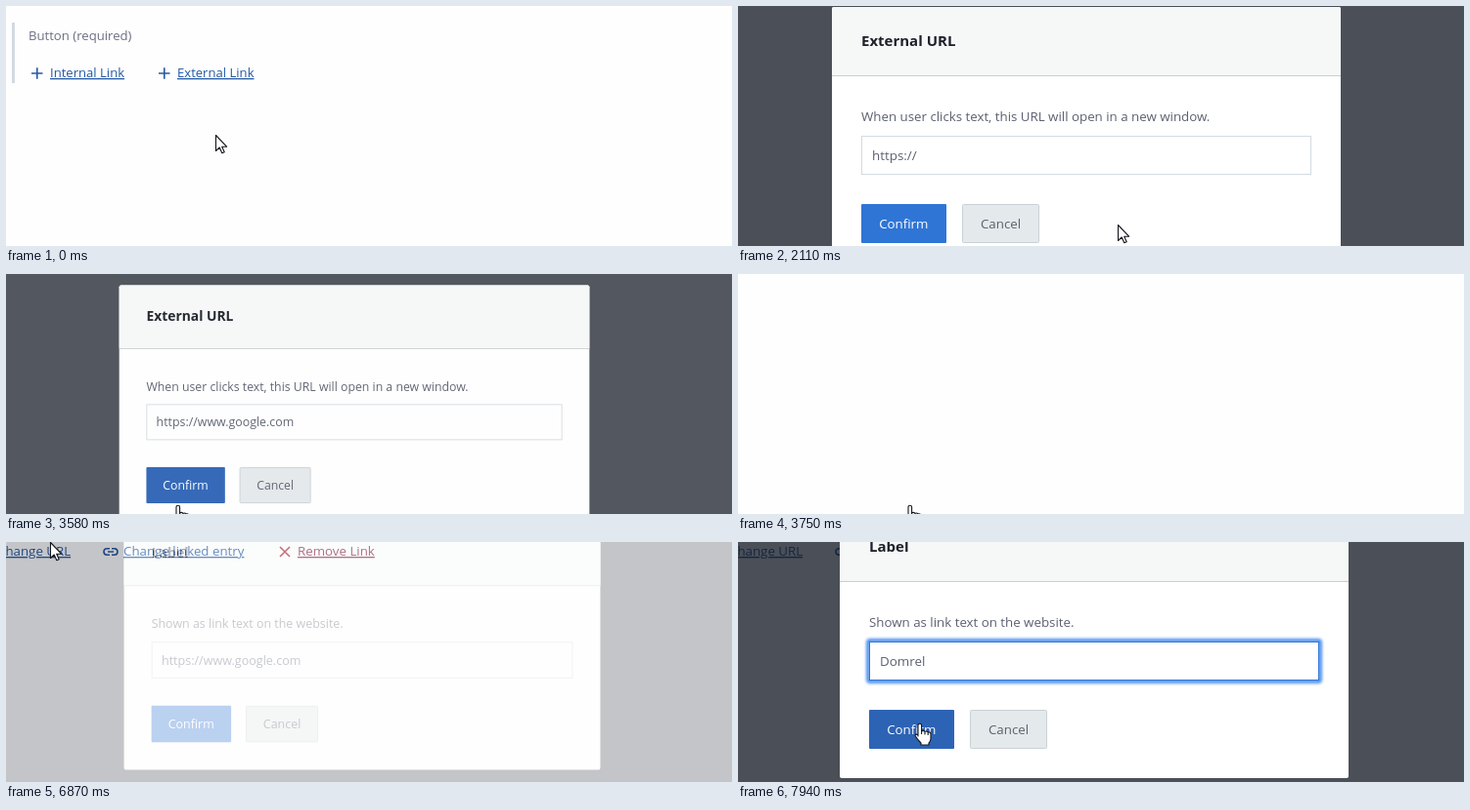
Recreate the animation shown at these times as an HTML page. Size 742 px wide and 246 px high, loop 8000 ms.

```html
<!DOCTYPE html>
<html lang="en">
<head>
<meta charset="utf-8">
<title>Link field demo</title>
<style>
  html, body { margin: 0; width: 100%; height: 100%; overflow: hidden; background: #fefefe; }
  svg { display: block; font: 13.3px "Open Sans", "Noto Sans", sans-serif; fill: #5c6070; }
  text { white-space: pre; }
  .muted { fill: #6b6f80; }
  .link { fill: #2459a5; stroke: none; text-decoration: underline; }
  .icon { fill: none; stroke: #2459a5; stroke-width: 1.6; }
  .hover .link { fill: #163f7c; }
  .hover .icon { stroke: #163f7c; }
  .hover .solid { fill: #163f7c; }
  .solid { fill: #2459a5; }
  .danger .link { fill: #8c2f4d; }
  .danger .icon { stroke: #b02f42; }
  .title { font-weight: 700; font-size: 15px; fill: #1d2129; }
  .field { fill: #fff; stroke: #d3dae2; }
  .focus .field { stroke: #2f75d6; }
  .value { font-size: 13.4px; }
  .button { text-anchor: middle; }
  .cursor { fill: #fff; stroke: #14161c; stroke-width: 1.1; stroke-linejoin: round; }
</style>
</head>
<body>
<svg width="742" height="246" viewBox="0 0 742 246">
  <defs>
    <filter id="blur" x="-5%" y="-50%" width="110%" height="200%"><feGaussianBlur stdDeviation="1.8"/></filter>
    <clipPath id="clip"><rect id="clipBox" y="140" height="26"/></clipPath>
    <path id="chain" d="M7 4.7H4.3a3.3 3.3 0 0 0 0 6.6H7M9 4.7h2.7a3.3 3.3 0 0 1 0 6.6H9M5 8h6"/>
  </defs>

  <g id="empty">
    <path d="M6 17h3v62h-3z" fill="#d3dae0"/>
    <text x="23" y="35" class="muted" font-size="13.15">Button (required)</text>
    <g font-size="13.1">
      <path class="icon" d="M26 69h11.5M31.8 63.2v11.5"/>
      <text class="link" x="45" y="73">Internal Link</text>
    </g>
    <g id="external" font-size="13.1">
      <path class="icon" d="M156 69h11.5M161.8 63.2v11.5"/>
      <text class="link" x="175" y="73">External Link</text>
    </g>
  </g>

  <g id="entry">
    <path d="M14 6h3v196h-3z" fill="#2f75d6"/>
    <text x="31" y="23" class="muted" font-size="13.15">Button (required)</text>
    <rect x="31.5" y="31.5" width="702" height="134" rx="1" fill="#e9edf0"/>
    <rect x="31.5" y="30.5" width="702" height="134" rx="1" fill="#fff" stroke="#d3dae0"/>
    <text x="46" y="63" class="muted" font-size="14.8">External</text>
    <text x="46" y="91" font-size="15.35" font-weight="700" fill="#1a1d24">https://www.google.com</text>
    <text x="46" y="119" font-size="15.25" fill="#2b2f38">https://www.google.com</text>
    <g id="rename">
      <path class="solid" transform="translate(30.7 182.8) scale(.75)" d="M3 17.25V21h3.75L17.81 9.94l-3.75-3.75zM20.71 7.04a1 1 0 0 0 0-1.41l-2.34-2.34a1 1 0 0 0-1.41 0l-1.83 1.83 3.75 3.75z"/>
      <text class="link" x="53" y="196">Change Label</text>
    </g>
    <use href="#chain" class="icon" x="170" y="184"/>
    <text class="link" x="191" y="196">Change URL</text>
    <use href="#chain" class="icon" x="299" y="184"/>
    <text class="link" x="320" y="196">Change linked entry</text>
    <g class="danger">
      <path class="icon" d="M480 187l10 10m0-10l-10 10"/>
      <text class="link" x="498" y="196">Remove Link</text>
    </g>
  </g>

  <g id="dialog">
    <rect width="742" height="246" fill="#0f141f" fill-opacity=".75"/>
    <g id="panel">
      <rect x="96" y="1" width="520" height="272" rx="2" fill="#fff"/>
      <path d="M96 71V3a2 2 0 0 1 2-2H614a2 2 0 0 1 2 2V71z" fill="#f6f8f8"/>
      <path d="M96 71.5H616" stroke="#c5ced3"/>
      <text id="title" class="title" x="126" y="41"></text>
      <text id="hint" x="126" y="118"></text>
      <rect id="glow" x="125" y="132" width="462" height="42" rx="2" fill="none" stroke="#4b90f0" stroke-width="4" filter="url(#blur)"/>
      <rect class="field" x="126.5" y="133.5" width="459" height="39"/>
      <text id="value" class="value" x="137" y="158"></text>
      <path id="squiggle" fill="none" stroke="#e0353b"/>
      <g id="selection" clip-path="url(#clip)">
        <rect x="137" y="144" width="153" height="19" fill="#2f86e8"/>
        <text class="value" x="137" y="158" fill="#fff">https://www.google.com</text>
      </g>
      <path id="caret" d="M289.5 144v19" stroke="#22252c"/>
      <rect id="confirm" x="126" y="203" width="87" height="40" rx="1"/>
      <text class="button" x="169.3" y="228" font-weight="500" fill="#fff">Confirm</text>
      <rect x="229.5" y="203.5" width="78" height="39" rx="1" fill="#e4e9eb" stroke="#c8d1d6"/>
      <text class="button" x="268.5" y="228">Cancel</text>
    </g>
  </g>

  <g id="cursor" class="cursor">
    <path id="arrow" d="M.5.5V16.5L4.2 13 6.8 18.8 9.2 17.7 6.7 12.2H11.6Z"/>
    <path id="hand" d="M-2 13V2a1.8 1.8 0 0 1 3.6 0V8q1.7-1.5 3.4.4 1.7-1 3.2.6 2.8-.6 2.8 2V16q-.5 3-2 4V22H1V20Q-2.500 16.500-5 12.500q.5-2.500 3-.5ZM1.600 8v3M5 8.400v3M8.200 9v3"/>
    <path id="beam" fill="none" d="M-3.500-8.500H-1L0-7.500 1-8.500H3.500M0-7.500V7.500M-3.500 8.500H-1L0 7.500 1 8.500H3.500"/>
  </g>
</svg>
<script>
const LOOP = 8000;
const URL_TEXT = "https://www.google.com";
const $ = id => document.getElementById(id);
const clamp = (v, lo, hi) => Math.min(hi, Math.max(lo, v));
const progress = (t, start, length) => clamp((t - start) / length, 0, 1);
const show = (id, on) => $(id).style.display = on ? "" : "none";

// Cursor stops: time, x, y, shape until the next stop
const stops = [
  [0, 214, 132, "arrow"], [60, 214, 132, "arrow"], [310, 213, 80, "hand"], [390, 213, 63, "hand"],
  [540, 213, 63, "arrow"], [540, 388, 270, "arrow"], [2090, 388, 270, "arrow"], [2110, 388, 224, "arrow"],
  [2130, 388, 224, "arrow"], [2300, 340, 165, "beam"], [2400, 330, 153, "beam"], [2560, 330, 153, "beam"],
  [2620, 300, 180, "arrow"], [2790, 185, 215, "hand"], [2880, 176, 250, "hand"], [2955, 176, 250, "hand"],
  [2970, 176, 237, "hand"], [3870, 176, 237, "arrow"], [3870, 215, -30, "arrow"], [4270, 215, -30, "arrow"],
  [4290, 216, 0, "arrow"], [4610, 383, 163, "arrow"], [5910, 383, 163, "arrow"], [5920, 383, 214, "arrow"],
  [5990, 383, 214, "arrow"], [6300, 225, 208, "arrow"], [6530, 112, 195, "hand"], [6700, 95, 188, "hand"],
  [6870, 95, 188, "arrow"], [6870, 45, 0, "arrow"], [7080, 45, 0, "arrow"], [7080, 328, 138, "beam"],
  [7120, 328, 138, "beam"], [7310, 49, 122, "beam"], [7640, 49, 122, "arrow"], [7830, 155, 180, "hand"],
  [7940, 186, 186, "hand"], [8000, 186, 186, "hand"]
];

function pointer(t) {
  let i = 0;
  while (i < stops.length - 2 && stops[i + 1][0] <= t) i++;
  const [t0, x0, y0, shape] = stops[i], [t1, x1, y1] = stops[i + 1];
  const k = progress(t, t0, t1 - t0);
  return { x: x0 + (x1 - x0) * k, y: y0 + (y1 - y0) * k, shape };
}

function wave(from, to) {
  let d = `M${from} 163`;
  for (let x = from + 2, up = true; x <= to; x += 2, up = !up) d += `L${x} ${up ? 161 : 163}`;
  return d;
}

function drawDialog(t, mouse) {
  const second = t >= 6850;
  const open = second ? progress(t, 6845, 80) : progress(t, 530, 250);
  const close = second ? 0 : progress(t, 3500, 251);
  const opacity = close ? 1 - close ** 2.7 : open;
  show("dialog", opacity > 0 && opacity <= 1);
  if (!opacity) return;

  const scale = 1 - .14 * (close ? 1 - (1 - close) ** 2 : (1 - open) ** 2);
  const [dx, dy] = second ? [8, -31] : [0, 0];
  $("dialog").setAttribute("opacity", opacity);
  $("panel").setAttribute("transform",
    `translate(${356 + dx} ${138 + dy}) scale(${scale}) translate(-356 -138)`);

  $("title").textContent = second ? "Label" : "External URL";
  $("hint").textContent = second ? "Shown as link text on the website."
    : "When user clicks text, this URL will open in a new window.";
  const value = second ? (t < 7630 ? URL_TEXT : "Domrel") : (t < 2640 ? "https://" : URL_TEXT);
  $("value").textContent = value;

  const focus = second ? t >= 7080 : t >= 2400 && t < 3500;
  $("panel").classList.toggle("focus", focus);
  show("glow", focus);
  const isUrl = value === URL_TEXT;
  show("squiggle", focus && isUrl);
  const selecting = second && t >= 7120 && isUrl;
  show("selection", selecting);
  const left = clamp(mouse.x - dx, 137, 290);
  $("clipBox").setAttribute("x", left);
  $("clipBox").setAttribute("width", 290 - left);
  show("caret", focus && isUrl && !selecting && (second || t < 3350));

  const px = mouse.x - dx, py = mouse.y - dy;
  const over = px > 126 && px < 213 && py > 203 && py < 243;
  $("confirm").setAttribute("fill", over ? "#2d63b5" : "#2f75d6");
}

function draw(t) {
  const mouse = pointer(t);
  show("empty", t < 540);
  show("entry", t >= 3870);
  $("entry").setAttribute("transform", t >= 6850 ? "translate(-200 -182)" : "");
  $("external").classList.toggle("hover", t >= 330);
  $("rename").classList.toggle("hover", t >= 6530);
  drawDialog(t, mouse);
  for (const shape of ["arrow", "hand", "beam"]) show(shape, shape === mouse.shape);
  $("cursor").setAttribute("transform", `translate(${mouse.x} ${mouse.y})`);
}

$("squiggle").setAttribute("d", wave(137, 168) + wave(182, 290));
const start = performance.now();
function tick() {
  draw((performance.now() - start) % LOOP);
  requestAnimationFrame(tick);
}
tick();
</script>
</body>
</html>
```
